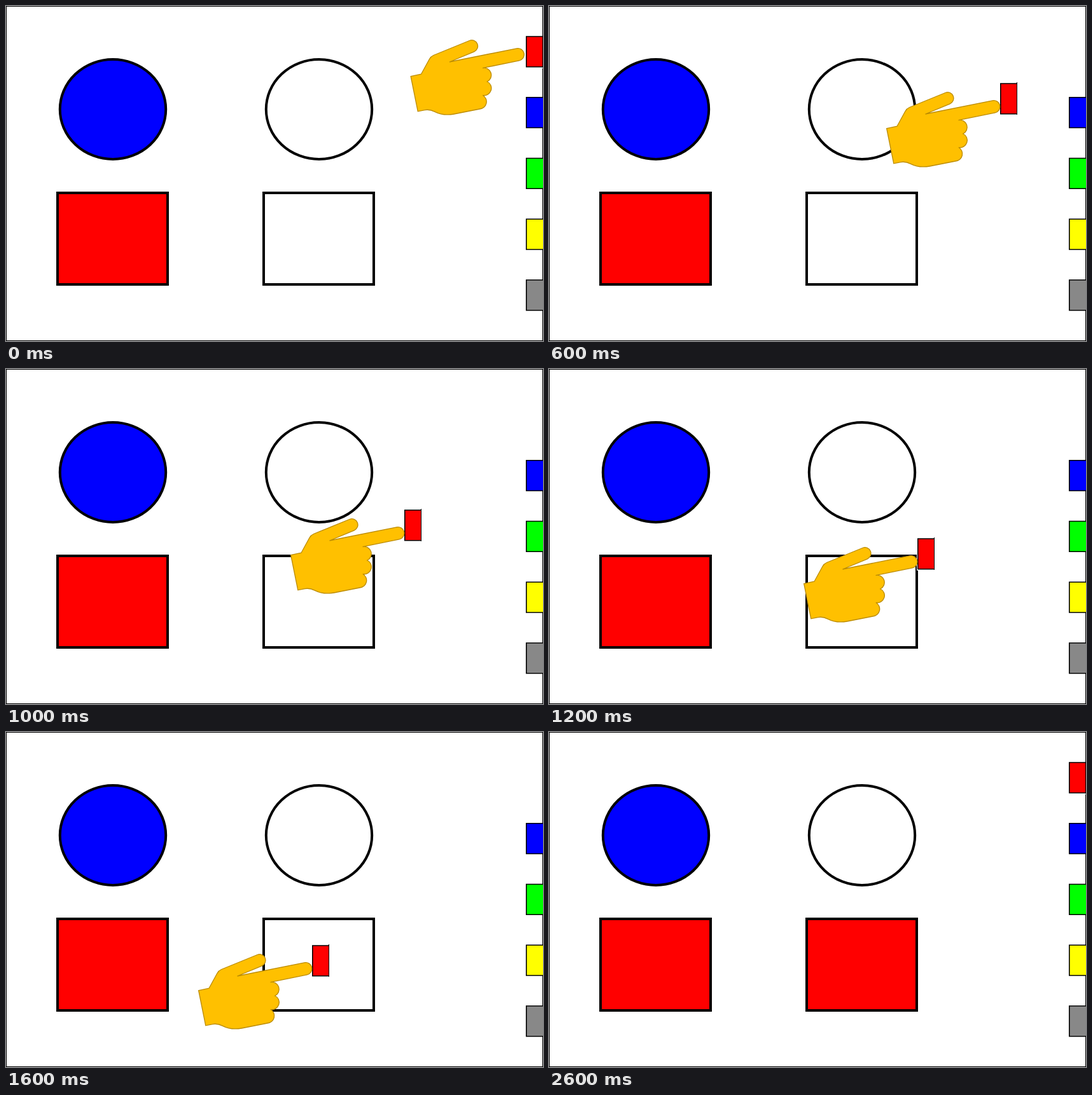
Recreate the animation shown at these times as an HTML page. Size 844 by 527 pixels, loop 3.8 s.

```html
<!DOCTYPE html>
<html lang="en">
<head>
<meta charset="utf-8">
<title>Colour the shapes</title>
<style>
  html, body { margin: 0; width: 100%; height: 100%; overflow: hidden; background: #fff; }
  svg { display: block; }
  .shape { stroke: #000; stroke-width: 4; }
  .swatch { stroke: #000; stroke-width: 1.6; }
</style>
</head>
<body>
<svg width="844" height="527" viewBox="0 0 844 527">
  <defs><path id="tab" d="M844 48H817.8V95.8H844"/></defs>
  <rect x=".5" y=".5" width="843" height="526" fill="#fff" stroke="#000"/>

  <g class="shape">
    <ellipse cx="168" cy="162.5" rx="83.2" ry="78.5" fill="#00f"/>
    <ellipse cx="492" cy="162.5" rx="83.2" ry="78.5" fill="#fff"/>
    <rect x="81" y="294" width="173" height="144" fill="#f00"/>
    <rect id="target" x="405" y="294" width="173" height="144"/>
  </g>

  <g class="swatch">
    <use href="#tab" y="95.75" fill="#00f"/>
    <use href="#tab" y="191.5" fill="#0f0"/>
    <use href="#tab" y="287.25" fill="#ff0"/>
    <use href="#tab" y="383" fill="#888"/>
  </g>

  <g id="red">
    <path d="M816 46H844V98H816Z" fill="#fff"/>
    <use class="swatch" href="#tab" fill="#f00"/>
    <path d="M843.5 46V97" stroke="#000"/>
  </g>

  <path id="hand" fill="#ffc000" stroke="#bc8c00" stroke-width="1.35" d="M636.2 110.7L652.5 107.2L665.5 83.5Q667.8 79.3 672 77.5
    L728.3 54.5A9.4 9.4 0 0 1 735.8 71.8L697 88L802.5 66.8A9.7 9.7 0 0 1 806.7 85.8L749 97.6
    A11.4 11.4 0 0 1 756.3 119A11.4 11.4 0 0 1 749.3 140.5A11.5 11.5 0 0 1 744.5 162
    L704 170Q687 173 674 166.3Q666 162.3 658.5 163.6L647.3 165.8Z"/>
</svg>
<script>
  const [target, red, hand] = ['target', 'red', 'hand'].map(id => document.getElementById(id));
  const LOOP = 3800, STEP = 200, TAP = 1800, LEAVE = 2600;
  // Offset of the dragged swatch at each step.
  const drag = [[0, 0], [-71, 38], [-89, 56], [-108, 74], [-128, 92],
                [-191, 174], [-238, 219], [-284, 264], [-336, 288]];

  const move = (el, x, y) => el.setAttribute('transform', `translate(${x} ${y})`);

  function draw() {
    const t = performance.now() % LOOP;
    const done = t >= TAP;
    const step = done ? 0 : Math.floor(t / STEP);
    const [x, y] = drag[step];

    move(red, x, y);
    target.setAttribute('fill', done ? '#f00' : '#fff');
    hand.setAttribute('visibility', t < LEAVE ? 'visible' : 'hidden');
    if (done) hand.setAttribute('transform', 'translate(313.3 449.3) rotate(-27.6) translate(-636.2 -110.7)');
    else if (step) move(hand, x + 2.5, y + 8);
    else move(hand, 0, 0);

    requestAnimationFrame(draw);
  }
  draw();
</script>
</body>
</html>
```
